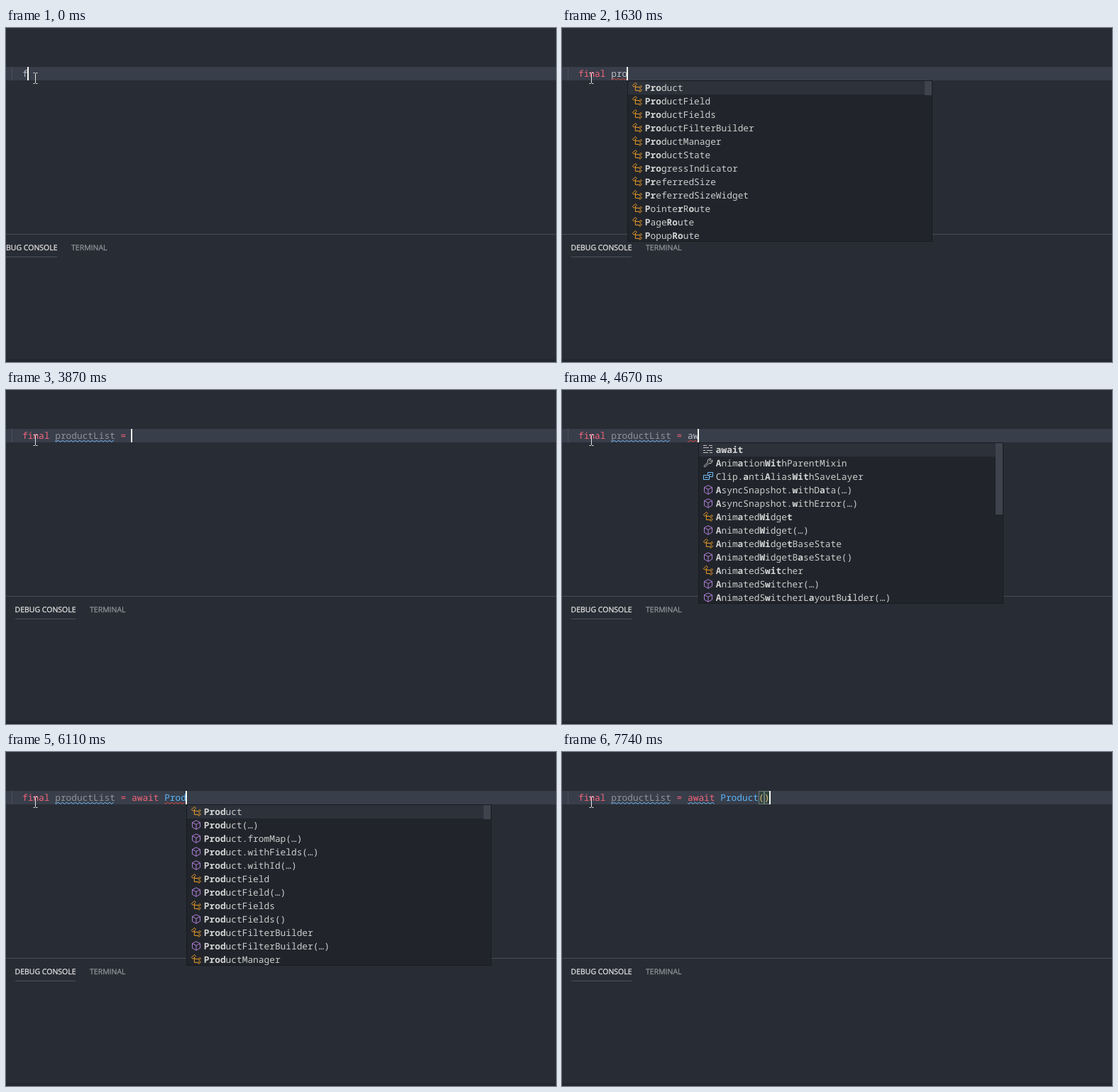
Recreate the animation shown at these times as an HTML page. Size 775 by 472 pixels, loop 8 s.

```html
<!DOCTYPE html>
<html lang="en">
<head>
<meta charset="utf-8">
<title>Code completion</title>
<style>
  html, body { margin: 0; width: 100%; height: 100%; overflow: hidden; background: #282c34; }
  svg { display: block; }
  text { text-rendering: geometricPrecision; }
  .code text { font: 12.833px "Noto Sans Mono", "DejaVu Sans Mono", monospace; }
  .code .hit { font-weight: 700; fill: #d4d4d4; }
  .tabs text { font: 10.5px "Open Sans", "Noto Sans", sans-serif; stroke-width: .25; }
  .line { fill: none; stroke-width: 1; }
</style>
</head>
<body>
<svg width="775" height="472" viewBox="0 0 775 472">
  <rect width="775" height="472" fill="#282c34"/>
  <rect y="55" width="775" height="19" fill="#383e4a"/>
  <rect x="8" y="55" width="1" height="19" fill="#4a505c"/>
  <rect y="291" width="775" height="1" fill="#484c55"/>
  <rect y="468" width="775" height="4" fill="#23272e"/>
  <g class="tabs" id="tabs">
    <text x="12.5" y="314" fill="#e7e7e7" stroke="#e7e7e7">DEBUG CONSOLE</text>
    <text x="118" y="314" fill="#93969c" stroke="#93969c">TERMINAL</text>
    <rect x="13" y="323" width="85" height="1" fill="#4b515c"/>
  </g>
  <g class="code" id="code"></g>
  <path class="line" d="M38.5 63.5h2l1 1 1-1h2M41.5 64.5v13M38.5 78.5h2l1-1 1 1h2" stroke="#e8e8e8"/>
</svg>
<script>
const LOOP = 8000, CHAR = 7.7, LEFT = 23, ROW = 19;
const LINE = 'final productList = await Product()';
const RED = '#f4647a', ERROR = '#e0483e', INFO = '#75beff', PLAIN = '#bbbfc6';

// Asterisks toggle emphasis; lists without them emphasise the typed letters.
const lists = {
  final: { thumb: 20, items: ['final', 'FixedColumnWidth', 'FixedColumnWidth(…)', 'FixedExtentMetrics',
    'FixedExtentMetrics(…)', 'FittedBox', 'FittedBox(…)', 'FileImage', 'FileImage(…)',
    'FilterQuality', 'FittedSizes', 'FittedSizes(…)'] },
  pro: { thumb: 20, items: ['Product', 'ProductField', 'ProductFields', 'ProductFilterBuilder',
    'ProductManager', 'ProductState', 'ProgressIndicator', 'PreferredSize', 'PreferredSizeWidget',
    'PointerRoute', 'PageRoute', 'PopupRoute'] },
  product: { items: ['Product', 'ProductField', 'ProductFields', 'ProductFilterBuilder',
    'ProductManager', 'ProductState'] },
  productL: { items: ['ProductFilterBuilder', 'ProductField', 'ProductFields'] },
  await: { thumb: 101, items: ['*await*', '*A*nim*a*tion*Wit*hParentMixin', 'Clip.*a*nti*A*lias*Wit*hSaveLayer',
    '*A*syncSnapshot.*w*ithD*a*ta(…)', '*A*syncSnapshot.*w*ithError(…)', '*A*nim*a*ted*Wi*dge*t*',
    '*A*nimated*W*idget(…)', '*A*nim*a*ted*Wi*dge*t*BaseState', '*A*nimated*W*idgetB*a*seState()',
    '*A*nim*a*tedS*wit*cher', '*A*nimatedS*w*itcher(…)', '*A*nimatedS*w*itcherL*a*youtBu*i*lder(…)'] },
  Product: { thumb: 20, items: ['Product', 'Product(…)', 'Product.fromMap(…)', 'Product.withFields(…)',
    'Product.withId(…)', 'ProductField', 'ProductField(…)', 'ProductFields', 'ProductFields()',
    'ProductFilterBuilder', 'ProductFilterBuilder(…)', 'ProductManager'] }
};

// [start time, typed characters, open list]
const steps = [
  [0, 1], [220, 2, 'final'], [420, 4, 'final'], [620, 5, 'final'],
  [1030, 6], [1250, 7, 'pro'], [1430, 8, 'pro'], [1630, 9, 'pro'],
  [2040, 11, 'pro'], [2230, 13, 'product'], [2630, 14, 'productL'],
  [2850, 15], [3050, 17], [3470, 18], [3670, 19], [3870, 20],
  [4280, 21, 'await'], [4480, 22, 'await'], [4690, 23, 'await'], [4890, 24, 'await'], [5090, 25, 'await'],
  [5290, 26], [5490, 27, 'Product'], [5690, 28, 'Product'], [5900, 29, 'Product'],
  [6110, 30, 'Product'], [6310, 32, 'Product'], [6520, 33, 'Product'],
  [6910, 33, 'Product'], [7530, 35, 'Product'], [7740, 35]
];

const smallDiamond = 'l2.5-2.6 1.4 1.4-2.6 2.6z';
const icons = {
  type: ['#ee9d28', `M1.4 5.4 5.4 1.4 7.4 3.4 3.4 7.4zM5.4 5.5V12.4H10.5M5.4 7.4H10.5M10.5 8${smallDiamond}M10.5 13${smallDiamond}`],
  call: ['#b180d7', 'M8 1.8 13.5 4.6V11.2L8 14.3 2.5 11.2V4.6zM2.5 4.6 8 7.5 13.5 4.6M8 7.5V14.3'],
  keyword: ['#c5c5c5', 'M1 2.5h5M9 2.5h5M1 5.5h8M11 5.5h3M1 9.5h3M6 9.5h8M1 12.5h7M10 12.5h4'],
  mixin: ['#c5c5c5', 'M2 12.5 7.4 7.2A3.7 3.7 0 0 1 12 2.3L9.8 4.6 11.4 6.2 13.7 4A3.7 3.7 0 0 1 8.8 8.6L3.5 14z'],
  member: ['#75beff', 'M7.5 5.5V2.5H14.5V8.5H9.5M1.5 6.5H9.5V12.5H1.5zM3.5 9.5H7.5M9.5 5.5H12.5']
};

const x = column => LEFT + column * CHAR;
const rect = (left, top, w, h, fill, extra = '') =>
  `<rect x="${left}" y="${top}" width="${w}" height="${h}" fill="${fill}" ${extra}/>`;
const text = (left, base, fill, body) => `<text x="${left}" y="${base}" fill="${fill}">${body}</text>`;

function squiggle(from, to, color) {
  const start = Math.round(x(from)), end = Math.round(x(to));
  let path = `M${start} 71.8`;
  for (let px = start + 1.7, low = true; px <= end; px += 3, low = !low) path += `L${px} ${low ? 73.4 : 71.2}`;
  return `<path class="line" stroke="${color}" d="${path}"/>`;
}

function wordColor(word, time) {
  if (/^(final|await|=)$/.test(word)) return RED;
  if (/^P/.test(word)) return '#5ab4f8';
  if (/[()]/.test(word)) return '#e5c07b';
  return word === 'productList' && time >= 3670 ? '#8f9298' : PLAIN;
}

function iconFor(label) {
  if (label.includes('(')) return icons.call;
  if (label.includes('Mixin')) return icons.mixin;
  if (label.includes('.')) return icons.member;
  return /^[a-z]/.test(label) ? icons.keyword : icons.type;
}

function emphasise(label, query) {
  const hit = s => `<tspan class="hit">${s}</tspan>`;
  if (label.includes('*')) return label.split('*').map((s, i) => i % 2 ? hit(s) : s).join('');
  let next = 0;
  return [...label].map(c => {
    const match = next < query.length && c.toLowerCase() === query[next].toLowerCase();
    if (match) next++;
    return match ? hit(c) : c;
  }).join('');
}

function popup(list, left, query) {
  const { items, thumb } = list, height = items.length * ROW;
  let out = rect(left, 74, 430, height, '#21252b') + rect(left + 1, 75, 428, ROW, '#2c313a');
  items.forEach((item, i) => {
    const label = item.replaceAll('*', ''), [color, path] = iconFor(label), top = 75 + i * ROW;
    out += `<path class="line" stroke="${color}" transform="translate(${left + 6} ${top + 1})" d="${path}"/>`
      + text(left + 24.8, top + 14, '#cccccc', emphasise(item, query));
  });
  if (thumb) out += rect(left + 419, 75, 10, thumb, '#3e434e');
  return out + rect(left + .5, 74.5, 429, height - 1, 'none', 'stroke="#181a1f"');
}

function draw([time, count, listName]) {
  const typed = LINE.slice(0, count), caret = Math.round(x(count));
  let out = '';
  if (count === 35) {
    for (const column of [33, 34])
      out += rect(Math.round(x(column)) + .5, 55.5, 7, 18, '#2f4342', 'stroke="#6f7a78"');
  }
  for (const { 0: word, index } of typed.matchAll(/\w+|[=()]/g))
    out += text(x(index), 69, wordColor(word, time), word);

  if (count > 6) out += squiggle(6, Math.min(count, 17), time < 3670 ? ERROR : INFO);
  if (count > 20 && time < 5490) out += squiggle(20, Math.min(count, 25), ERROR);
  if (count > 26 && time < 6520) out += squiggle(26, count, ERROR);
  if (time >= 6520) out += squiggle(20, 25, INFO);

  if (listName) out += popup(lists[listName], caret, typed.match(/(\w+)\W*$/)[1]);
  if (time !== 6910) out += rect(caret - 1, 55, 2, 19, '#f8f8f0');
  document.getElementById('code').innerHTML = out;
  document.getElementById('tabs').setAttribute('transform', `translate(${time < 220 ? -26 : 0} 0)`);
}

const begin = performance.now();
let shown;
function tick() {
  const now = (performance.now() - begin) % LOOP;
  const step = steps.findLast(([time]) => time <= now) || steps[0];
  if (step !== shown) draw(shown = step);
  requestAnimationFrame(tick);
}
tick();
</script>
</body>
</html>
```
